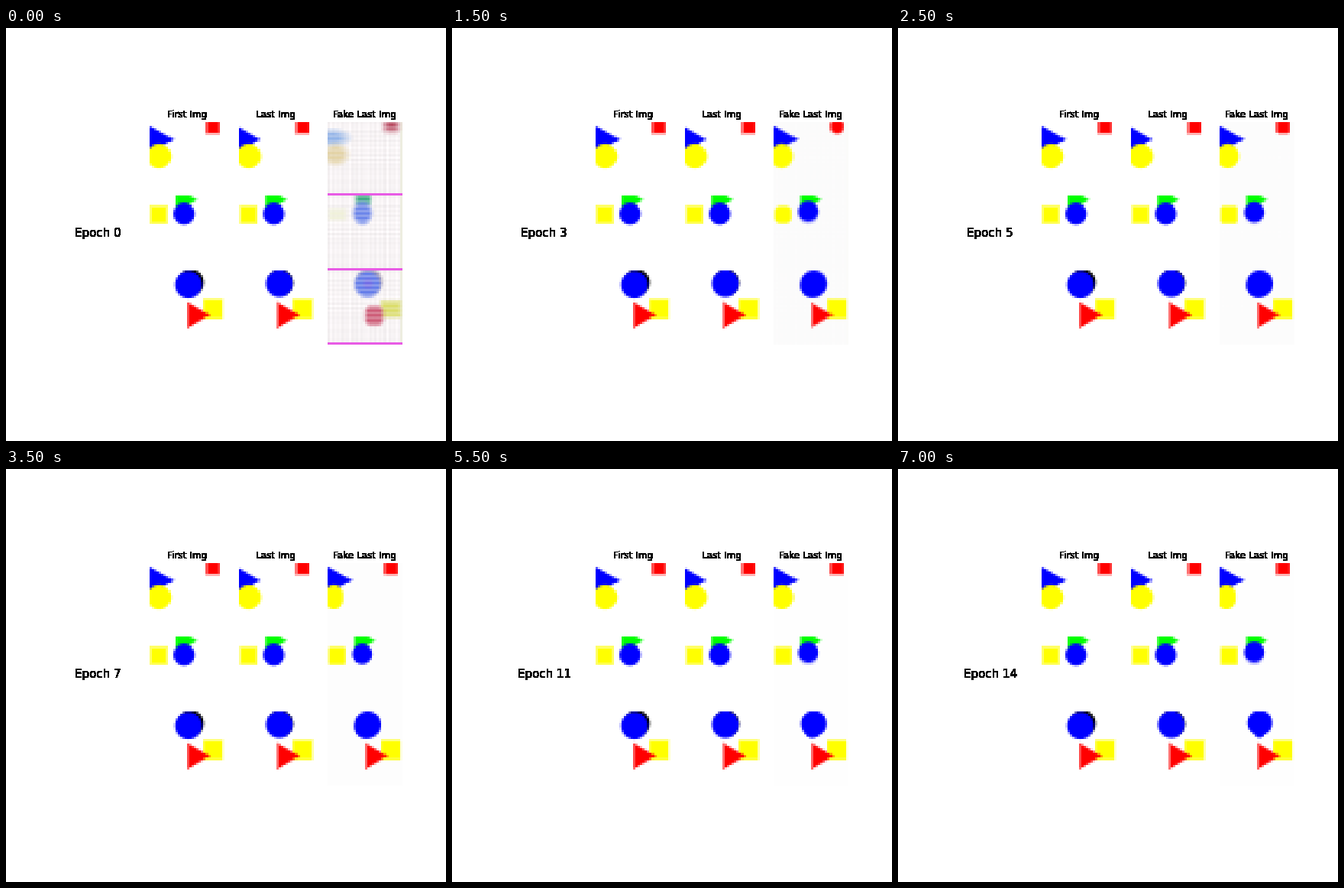
A matplotlib script for the animation above (7500 ms loop, 576 px wide and 540 px high).

```python
import numpy as np
import matplotlib.pyplot as plt
from matplotlib.animation import FuncAnimation

SIZE = 32
EPOCHS = 15
RED, GREEN, BLUE = (1, 0, 0), (0, 1, 0), (0, 0, 1)
YELLOW, BLACK, WHITE = (1, 1, 0), (0, 0, 0), (1, 1, 1)
Y, X = np.mgrid[:SIZE, :SIZE] + 0.5


# Signed distances, negative inside the shape
def disc(x, y, rx, ry=None):
    ry = ry or rx
    return (np.hypot((X - x) / rx, (Y - y) / ry) - 1) * min(rx, ry)


def box(x0, y0, x1, y1, r=0.0):
    dx = abs(X - (x0 + x1) / 2) - (x1 - x0) / 2 + r
    dy = abs(Y - (y0 + y1) / 2) - (y1 - y0) / 2 + r
    outside = np.hypot(np.maximum(dx, 0), np.maximum(dy, 0))
    return outside + np.minimum(np.maximum(dx, dy), 0) - r


def tri(left, tip, y, h):
    w = tip - left
    side = ((X - tip) * h + abs(Y - y) * w) / np.hypot(h, w)
    return np.maximum(left - X, side)


def draw(*shapes, back=WHITE, soft=1.0):
    """Paint (distance, colour[, alpha]) entries on one tile."""
    tile = np.ones((SIZE, SIZE, 3)) * back
    for dist, color, *alpha in shapes:
        cover = np.clip(0.5 - dist / soft, 0, 1)[..., None]
        cover = cover * (alpha[0] if alpha else 1)
        tile = tile * (1 - cover) + np.array(color) * cover
    return tile


def real_img(t):
    """The moving shapes at the start (t=0) or the end (t=1) of their path."""
    d = 0.15 * t
    return np.vstack([
        draw((box(24.3 + d, -1, 29.8 + d, 5.3), RED),
             (tri(-1 - t, 10.5 - 1.3 * t, 7.9, 6.4), BLUE),
             (disc(4.1 + d, 15, 5.1), YELLOW)),
        draw((box(0.4 + d, 4.4, 7.6 + d, 11.7), YELLOW),
             (tri(11.1 + d, 20.4 + d, 1.8, 5.3), GREEN),
             (disc(14.7 + d, 7.7, 4.6), BLUE)),
        draw((disc(17.7, 5.2 + d, 5.6), BLACK),
             (disc(16.6 + 0.7 * t, 6.2 - 0.5 * t, 5.85), BLUE),
             (box(23.2, 12.5, 31.2 + d, 20.8), YELLOW),
             (tri(16.3 + d, 25.7 + d, 19.3, 5.4), RED)),
    ])


def mesh(strength):
    """Faint woven texture of an untrained upsampling network."""
    rng = np.random.default_rng(4)
    weave = 0.012 * (X // 1 % 2 + Y // 1 % 2 + (X // 1 % 4 == 1))
    weave += rng.normal(0, 0.007, (SIZE, 1)) + rng.normal(0, 0.007, SIZE)
    back = np.array([0.957, 0.942, 0.947]) + weave[..., None]
    back[:, -1] = (0.93, 0.93, 0.88)
    return 1 - strength * (1 - np.clip(back, 0, 1))


def untrained():
    back = mesh(1)
    streak = (0.8 + 0.25 * (Y // 1 % 2))[..., None]
    tiles = [
        draw((box(24.2, -2, 30.4, 4.6, 1.5), (0.77, 0.38, 0.46), 0.75),
             (disc(27.2, 1.6, 2), (0.68, 0.2, 0.3), 0.6),
             (disc(2, 7.2, 6, 3), (0.5, 0.66, 0.9), 0.8),
             (disc(3.5, 14.3, 4.8, 4), (0.86, 0.78, 0.54), 0.7),
             back=back, soft=3),
        draw((box(0.5, 5.5, 8, 10.5, 1), (0.93, 0.94, 0.82), 0.7),
             (box(12, -3, 18.5, 4, 1.5), (0.22, 0.66, 0.5), 0.9),
             (disc(14.9, 7.4, 3.9, 4.6), (0.43, 0.53, 0.92), 0.95),
             back=back, soft=2.2),
        draw((disc(17.9, 4.8, 5.5), (0.55, 0.5, 0.6), 0.8),
             (disc(17.1, 6, 5.6), (0.43, 0.52, 0.92)),
             (disc(17.3, 5.8, 2), (0.5, 0.43, 0.9), 0.7),
             (box(23, 13.3, 31.2, 20.2, 0.8), (0.86, 0.87, 0.42), 0.95),
             (box(16.2, 15.6, 23.8, 23.6, 2.5), (0.8, 0.34, 0.45), 0.9),
             back=back, soft=2),
    ]
    for i, tile in enumerate(tiles):
        tiles[i] = back + (tile - back) * streak
        tiles[i][-1] = (0.91, 0.36, 0.9)
    return np.vstack(tiles)


def fake_img(epoch):
    if epoch == 0:
        return untrained()
    raw = np.exp(-epoch / 2)                      # early roughness
    late = np.clip((epoch - 7) / 7, 0, 1)         # late drift of the big disc
    bump = np.exp(-((epoch - 7) / 3) ** 2)        # small disc dips midway
    right = 7.6 + np.cos(2 * np.pi * (epoch - 4) / 7.5)
    dot_y = 6.5 + 0.9 * bump
    look = dict(back=(1 - 0.016 * np.exp(-epoch / 7)) * mesh(0.3 * raw),
                soft=1 + raw)
    return np.vstack([
        draw((box(24.3, -1, 29.9, 5.3, min(2.8, 0.3 + 10 * raw)), RED),
             (tri(-1, 10.5, 7.8, 6.4), BLUE),
             (box(-1.2, 9.9, right, 20, (right + 1.2) / 2), YELLOW), **look),
        draw((box(0.5, 4.4, 7.8, 11.8, min(3, 0.6 + 9 * raw)), YELLOW),
             (tri(11.4, 20.4, 1.8, 5.3), GREEN),
             (disc(14.8, dot_y + 1, 4.4), (0.3, 0.3, 1), 0.4 * (1 - bump)),
             (disc(14.8, dot_y, 4.3), BLUE), **look),
        draw((disc(17.2, 5.8 - 0.8 * late, 5.8 - 0.4 * late), BLUE),
             (disc(16.2 + 0.9 * late ** 2, 7 + 2.1 * late, 4.7 - 2.4 * late), BLUE),
             (box(23.1, 12.5, 31.1, 20.8, 0.4), YELLOW),
             (tri(16.4, 25.6 - 2 * raw, 19.3, 5.4 - 2 * raw), RED), **look),
    ])


def solid(img, dpi):
    """Turn smoothed glyph edges into fully opaque pixels."""
    img = img.copy()
    img[..., 3] = img[..., 3] > 0
    return img, 0, 0


plt.rcParams["font.family"] = "DejaVu Sans"
fig, axes = plt.subplots(1, 4, figsize=(8, 7.5), dpi=72, facecolor="white")
fig.subplots_adjust(left=0.125, right=0.9, bottom=0.125, top=0.88, wspace=0.2)
for ax in axes:
    ax.axis("off")

label = axes[0].text(0.5, 0.5, "", size=15, ha="center", va="center")
label.set_agg_filter(solid)

fakes = [np.clip(fake_img(e), 0, 1) for e in range(EPOCHS)]
panels = {"First Img": real_img(0), "Last Img": real_img(1),
          "Fake Last Img": fakes[0]}
for ax, (title, img) in zip(axes[1:], panels.items()):
    view = ax.imshow(np.clip(img, 0, 1), interpolation="nearest")
    ax.set_title(title, size=12).set_agg_filter(solid)


def update(epoch):
    label.set_text(f"Epoch {epoch}")
    view.set_data(fakes[epoch])
    return label, view


anim = FuncAnimation(fig, update, frames=EPOCHS, interval=500,
                     repeat=True, repeat_delay=0, blit=False)
plt.show()
```
